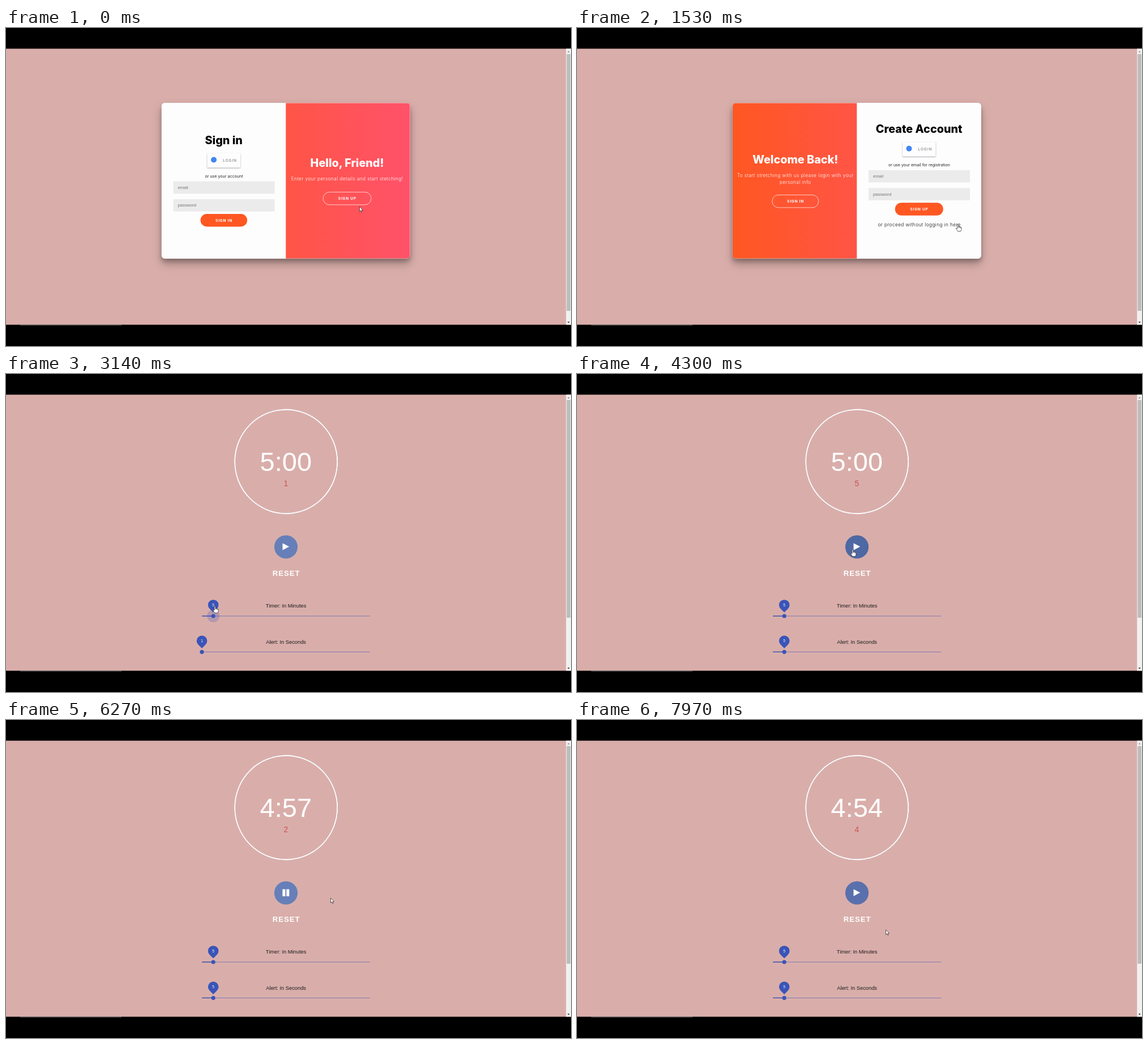
Recreate the animation shown at these times as an HTML page. Size 998 by 561 pixels, loop 8000 ms.

```html
<!DOCTYPE html>
<html lang="en">
<head>
<meta charset="utf-8">
<title>Stretch timer</title>
<style>
  html, body { margin: 0; width: 100%; height: 100%; overflow: hidden; background: #000; }
  svg { display: block; width: 100%; height: 100%; }
  text { font-family: Inter, sans-serif; text-anchor: middle; white-space: pre; }
  .title { font-size: 19.8px; font-weight: 800; }
  .body { font-size: 8.3px; font-weight: 300; letter-spacing: .4px; }
  .small { font-size: 7.1px; fill: #222; }
  .button { font-size: 6.6px; font-weight: 700; letter-spacing: .75px; fill: #fff; }
  .field { font: 7.6px "Liberation Sans", Arial, sans-serif; text-anchor: start; fill: #757575; }
  .login { font: 7px Roboto, sans-serif; letter-spacing: 1px; text-anchor: start; fill: #757575; }
  .timer text { font-family: "Liberation Sans", Arial, sans-serif; }
  .card-shadow { filter: drop-shadow(0 8px 8px rgba(0,0,0,.25)) drop-shadow(0 5px 3px rgba(0,0,0,.22)); }
  .login-box { filter: drop-shadow(0 1px 1px rgba(40,40,70,.4)); }
</style>
</head>
<body>
<svg id="stage" viewBox="0 0 998 561"></svg>
<script>
const HALF = 219.5, CARD_X = 274.8;
const CARD = `x="${CARD_X}" y="132.3" width="${2 * HALF}" height="274.4"`;
const SLIDE_START = 350, SLIDE_TIME = 300, PAGE_CHANGE = 1670;
const TIMER_START = 4450, TIMER_STOP = 7500, TICK = 500;
const LOOP = 8000;

// time, x, y of the pointer tip
const POINTER_PATH = [
  [0, 624.5, 315], [220, 610, 302], [450, 610, 302], [1250, 673, 346], [1750, 673, 346],
  [2550, 349, 409], [2650, 349, 409], [3050, 369, 409], [3200, 369, 409],
  [3550, 349, 473], [3650, 349, 473], [4000, 369, 473], [4350, 493.5, 300], [4500, 493.5, 300],
  [5100, 840, 358], [5300, 840, 358], [6270, 573.5, 314], [6950, 493.5, 300],
  [7480, 493.5, 300], [7900, 545.5, 370], [8000, 545.5, 370]
];
const HAND_TIMES = [[100, 500], [1200, PAGE_CHANGE], [2480, 3230], [3480, 4080], [4300, 4560], [6780, 7560]];

const text = (x, y, cls, str, extra = '') => `<text x="${x}" y="${y}" class="${cls}" ${extra}>${str}</text>`;
const pill = (cx, y, w, attrs) => `<rect x="${cx - w / 2}" y="${y}" width="${w}" height="22.4" rx="11.2" ${attrs}/>`;

const field = (y, label) =>
  `<rect x="295.5" y="${y}" width="179" height="21.7" fill="#ebebeb"/>` + text(303.5, y + 13.3, 'field', label);

const form = (dy, title, hint, button, width, footer = '') => `
  <rect x="${CARD_X}" y="132" width="${HALF}" height="275" fill="#fdfdfd"/>
  <g transform="translate(0 ${dy})">
    ${text(384.7, 205, 'title', title)}
    <rect class="login-box" x="355.5" y="221" width="58.5" height="25.3" rx="1" fill="#fdfdfd"/>
    <circle cx="367" cy="232.5" r="5" fill="#4285f4"/>
    ${text(383, 236, 'login', 'LOGIN')}
    ${text(385, 264, 'small', hint)}
    ${field(270.5, 'email')}${field(302, 'password')}
    ${pill(384.8, 328, width, 'fill="#ff5722"')}
    ${text(385, 341.7, 'button', button)}
    ${footer}
  </g>`;

const panel = (titleX, titleY, title, lines, lineY, buttonY, button, width) =>
  text(titleX, titleY, 'title', title, 'fill="#fff"') +
  lines.map((line, i) => text(titleX, lineY + i * 11.5, 'body', line, 'fill="#fff"')).join('') +
  pill(titleX, buttonY, width, 'fill="none" stroke="#fff" stroke-width=".7"') +
  text(titleX + .3, buttonY + 13.6, 'button', button);

const slider = (id, y, label) => `
  ${text(494.6, y - 14.7, '', label, 'font-size="9.3" fill="#1c1c1c"')}
  <path d="M346 ${y}H643" stroke="#3f55b5" stroke-opacity=".65" stroke-width=".9"/>
  <path id="${id}Fill" stroke="#3a50b0" stroke-width="1.3"/>
  <g id="${id}Thumb">
    <circle id="${id}Halo" r="11" fill="#3f55b5" fill-opacity=".24"/>
    <circle r="3.6" fill="#3a54b8"/>
    <path d="M0 -6.4L-6.6 -13A9.3 9.3 0 1 1 6.6 -13Z" fill="#3a54b8"/>
    <text id="${id}Value" y="-17.2" font-size="6.6" fill="#fff"></text>
  </g>`;

document.getElementById('stage').innerHTML = `
  <defs>
    <linearGradient id="warm"><stop stop-color="#ff5722"/><stop offset="1" stop-color="#ff526a"/></linearGradient>
    <clipPath id="cardClip"><rect ${CARD} rx="5.5"/></clipPath>
    <clipPath id="overlayClip"><rect id="overlayBox" y="132" width="${HALF}" height="275"/></clipPath>
    <clipPath id="outsideRing"><path clip-rule="evenodd"
      d="M390 50H600V260H390ZM403.4 154.5a91.3 91.5 0 1 0 182.6 0a91.3 91.5 0 1 0 -182.6 0"/></clipPath>
  </defs>
  <rect y="36.5" width="998" height="487" fill="#d9aeaa"/>
  <path d="M25 524H204" stroke="#999" stroke-width=".8"/>

  <g id="loginPage">
    <rect class="card-shadow" ${CARD} rx="5.5" fill="#fdfdfd"/>
    <g clip-path="url(#cardClip)">
      <g id="signIn">${form(0, 'Sign in', 'or use your account', 'SIGN IN', 82.5)}</g>
      <g id="signUp">${form(-19.7, 'Create Account', 'or use your email for registration', 'SIGN UP', 85,
        text(385.2, 370.2, 'body', 'or proceed without logging in here', 'fill="#111"'))}</g>
      <g clip-path="url(#overlayClip)">
        <rect ${CARD} fill="url(#warm)"/>
        <g id="welcome">${panel(385.7, 238.5, 'Welcome Back!',
          ['To start stretching with us please login with your', 'personal info'], 263, 294.5, 'SIGN IN', 82)}</g>
        <g id="hello">${panel(602.6, 244.5, 'Hello, Friend!',
          ['Enter your personal details and start stetching!'], 269, 289.5, 'SIGN UP', 85)}</g>
      </g>
    </g>
  </g>

  <g id="timerPage" class="timer">
    <g clip-path="url(#outsideRing)" fill-opacity=".85">
      <ellipse id="redGlow" rx="91.5" ry="92.5" fill="#cf4f58"/>
      <ellipse id="blueGlow" rx="91.5" ry="92.5" fill="#4d6ba8"/>
    </g>
    <ellipse id="ring" cx="494.7" cy="154.5" fill="none" stroke="#fff" stroke-width="1.9"/>
    <text id="clock" x="494.3" y="171" font-size="47" fill="#fff"></text>
    <text id="alertCount" x="494.3" y="197.7" font-size="13.8" fill="#cf504f"></text>
    <circle id="playButton" cx="494.5" cy="305" r="20.6"/>
    <path id="playIcon" fill="#fff"/>
    ${text(495.2, 356, '', 'RESET', 'font-size="13.2" font-weight="700" letter-spacing="1" fill="#fff"')}
    ${slider('minutes', 427, 'Timer: In Minutes')}
    ${slider('seconds', 490.3, 'Alert: In Seconds')}
  </g>

  <rect x="989.3" y="36.5" width="8.7" height="487" fill="#f1f1f1"/>
  <rect id="scrollThumb" x="990.3" y="46" width="6.7" fill="#bdbdbd"/>
  <path d="M991.7 43h4l-2 -2.4z" fill="#8a8a8a"/>
  <path d="M991.7 518h4l-2 2.4z" fill="#333"/>

  <g id="pointer" stroke="#222" stroke-width=".7" stroke-linejoin="round" fill="#fff">
    <path id="arrow" d="M0 0V8.6L2 6.8L3.4 9.8L4.7 9.2L3.4 6.4H6Z"/>
    <path id="hand" d="M-1 1Q0 -.6 1 1V4.6Q2 3.6 2.9 4.9Q3.9 4.1 4.6 5.3Q5.9 4.8 6 6.3V9Q5.9 10.8 4.8 12.6H-.4
      Q-1.6 10.4 -3.3 8.1Q-3.6 6.5 -2 7L-1 8ZM1 4.6V6.4M2.9 5V6.8M4.6 5.5V7"/>
  </g>`;

const el = id => document.getElementById(id);
const clamp = x => Math.min(1, Math.max(0, x));
const smooth = x => x * x * (3 - 2 * x);
const progress = (t, from, to) => smooth(clamp((t - from) / (to - from)));
const moveX = (id, x) => el(id).setAttribute('transform', `translate(${x} 0)`);
const show = (id, visible) => el(id).setAttribute('display', visible ? 'inline' : 'none');
const within = (t, [from, to]) => t >= from && t < to;

function drawLogin(t) {
  const e = progress(t, SLIDE_START, SLIDE_START + SLIDE_TIME);
  moveX('signIn', HALF * e);
  moveX('signUp', HALF * e);
  show('signUp', t >= SLIDE_START + SLIDE_TIME / 2);
  el('overlayBox').setAttribute('x', CARD_X + HALF * (1 - e));
  moveX('welcome', -.2 * HALF * (1 - e));
  moveX('hello', .2 * HALF * e);
}

function drawSlider(id, y, value, active) {
  const x = 346 + (value - 1) * 297 / 59;
  el(id + 'Fill').setAttribute('d', `M346 ${y}H${x}`);
  el(id + 'Thumb').setAttribute('transform', `translate(${x} ${y})`);
  el(id + 'Value').textContent = value;
  show(id + 'Halo', active);
}

// the rim swells quickly on each tick, then sinks back
function drawRing(t) {
  const phase = (t - TIMER_START) % TICK / TICK;
  const glow = within(t, [TIMER_START, 7950])
    ? 2.3 * clamp(phase / .1) * Math.max(0, Math.cos(phase * Math.PI * .75)) : 0;
  for (const [id, side] of [['redGlow', -1], ['blueGlow', 1]]) {
    el(id).setAttribute('cx', 494.7 + side * glow);
    el(id).setAttribute('cy', 154.5 - side * glow * .4);
  }
  el('ring').setAttribute('rx', 90.6 + glow * .35);
  el('ring').setAttribute('ry', 91.8 - glow * .3);
}

function drawTimer(t) {
  const minutes = 1 + Math.round(4 * progress(t, 2650, 3050));
  const alertEvery = 1 + Math.round(4 * progress(t, 3650, 4000));
  drawSlider('minutes', 427, minutes, within(t, [2550, 3230]));
  drawSlider('seconds', 490.3, alertEvery, within(t, [3550, 4080]));

  const ticks = Math.max(0, Math.floor((Math.min(t, TIMER_STOP) - TIMER_START) / TICK));
  const left = minutes * 60 - ticks;
  el('clock').textContent = Math.floor(left / 60) + ':' + String(left % 60).padStart(2, '0');
  el('alertCount').textContent = alertEvery - ticks % alertEvery;
  drawRing(t);

  const hovered = within(t, [4300, 4560]) || within(t, [6780, 7560]);
  el('playButton').setAttribute('fill', hovered ? '#4e68a4' : t >= 7560 ? '#5a70ad' : '#667fb8');
  el('playIcon').setAttribute('d', within(t, [TIMER_START, TIMER_STOP])
    ? 'M488.4 298.5h5v12.4h-5zM495.3 298.5h5v12.4h-5z' : 'M488.5 298.4L500.2 304.5L488.5 310.7Z');
}

function drawPointer(t) {
  const next = Math.max(1, POINTER_PATH.findIndex(key => key[0] > t));
  const [t0, x0, y0] = POINTER_PATH[next - 1], [t1, x1, y1] = POINTER_PATH[next];
  const k = progress(t, t0, t1);
  el('pointer').setAttribute('transform', `translate(${x0 + (x1 - x0) * k} ${y0 + (y1 - y0) * k})`);
  const hand = HAND_TIMES.some(span => within(t, span));
  show('hand', hand);
  show('arrow', !hand);
}

function frame(now) {
  const t = now % LOOP;
  const onLogin = t < PAGE_CHANGE;
  show('loginPage', onLogin);
  show('timerPage', !onLogin);
  el('scrollThumb').setAttribute('height', onLogin ? 453 : 384);
  if (onLogin) drawLogin(t); else drawTimer(t);
  drawPointer(t);
  requestAnimationFrame(frame);
}
requestAnimationFrame(frame);
</script>
</body>
</html>
```
